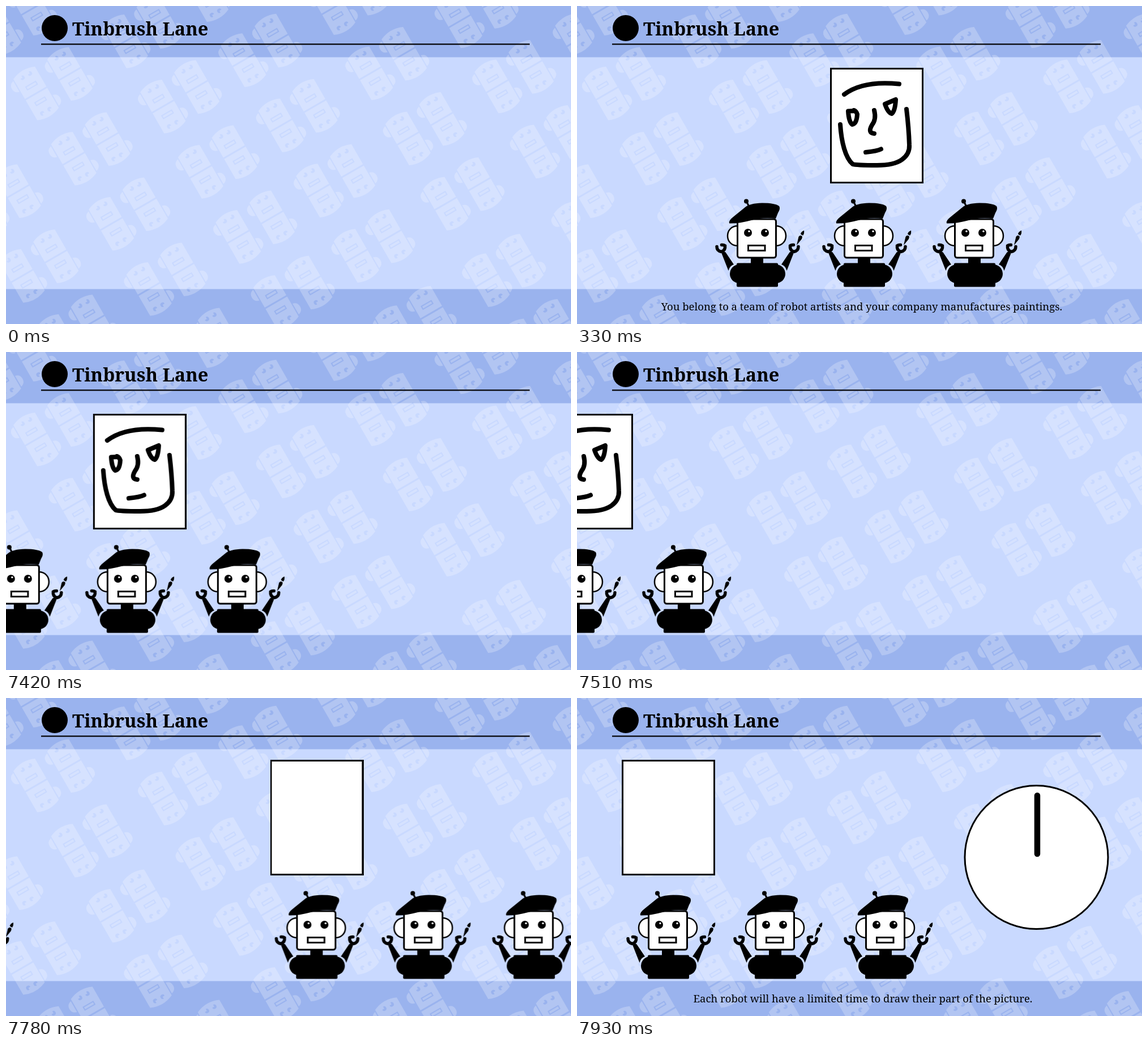
These frames come from a looping animation (998 px wide and 561 px high, 8 s). An HTML page:

```html
<!DOCTYPE html>
<html lang="en">
<head>
<meta charset="utf-8">
<title>Tinbrush Lane</title>
<style>
  html, body { margin: 0; width: 100%; height: 100%; overflow: hidden; background: #9ab3ee; }
  svg { display: block; width: 998px; height: 561px; }
  text { font-family: "Noto Serif", serif; font-size: 18.5px; text-anchor: middle; }
  .title { font-size: 32.4px; font-weight: 700; text-anchor: start; }
  .paper { fill: #fff; stroke: #000; stroke-width: 3; }
  .ink { fill: none; stroke: #000; stroke-width: 8; stroke-linecap: round; stroke-linejoin: round; }

  .first, .second, .cap1, .cap2 { animation: 8s linear infinite; }
  .first { animation-name: first; }
  .second { animation-name: second; }
  .cap1 { animation-name: cap1; }
  .cap2 { animation-name: cap2; }

  /* the scene moves once every 30 ms */
  @keyframes first {
    0% { transform: translateX(806px); animation-timing-function: steps(11, end); }
    4.125%, 91.25% { transform: translateX(0); animation-timing-function: steps(10, end); }
    95% { transform: translateX(-733px); animation-timing-function: steps(11, end); }
    99.125%, 100% { transform: translateX(-805px); }
  }
  @keyframes second {
    0%, 94.625% { transform: translateX(930px); animation-timing-function: steps(12, end); }
    99.125%, 100% { transform: translateX(0); }
  }
  @keyframes cap1 {
    0% { opacity: 0; animation-timing-function: step-end; }
    4.125% { opacity: 1; animation-timing-function: step-end; }
    91.625%, 100% { opacity: 0; animation-timing-function: step-end; }
  }
  @keyframes cap2 {
    0% { opacity: 0; animation-timing-function: step-end; }
    99.125%, 100% { opacity: 1; }
  }
</style>
</head>
<body>
<svg viewBox="0 0 998 561">
  <defs>
    <path id="half" fill-rule="evenodd" d="M-22-1.5V-42Q0-52 22-42V-1.5Z
      M-24-39Q-33-37-33-28Q-33-19-24-17Z
      M-11-36a4 4 0 1 0 4-4v4z M4-36a4 4 0 1 0 4-4v4z
      M-11-20H11V-12H-11Z M-9-18H9V-14H-9Z"/>
    <g id="card">
      <use href="#half"/>
      <use href="#half" transform="rotate(180)"/>
    </g>
    <g id="pair" transform="rotate(-30)">
      <use href="#card" x="-34.5"/>
      <use href="#card" x="34.5"/>
    </g>

    <path id="ear" class="paper" style="stroke-width:2.5" d="M284 388C260 388 260 423 284 423"/>
    <g id="arm">
      <path d="M255.5 436.5Q259 432 262.5 434.5L277 456Q270 458 267.5 467Z"/>
      <path d="M247 424.5Q247 432 255 433.5Q262.5 431 261.5 423Q259 421 255.5 421.5"
        fill="none" stroke="#000" stroke-width="5.5" stroke-linecap="round"/>
    </g>
    <g id="eye">
      <circle cx="302" cy="400" r="7"/>
      <circle cx="304" cy="397.5" r="1.7" fill="#fff"/>
    </g>
    <g id="robot">
      <use href="#ear"/>
      <use href="#ear" transform="matrix(-1 0 0 1 635 0)"/>
      <rect x="307" y="444" width="22" height="12"/>
      <rect x="282" y="453.5" width="73" height="42" rx="2"/>
      <rect x="270" y="456" width="98" height="33" rx="16.5"/>
      <use href="#arm"/>
      <use href="#arm" transform="matrix(-1 0 0 1 638 0)"/>
      <path d="M388 422L391.5 407Q395 402.5 398 407L397 411Z"/>
      <path d="M395 402.5Q395.5 398 401 396Q402 401 399 405Z"/>
      <rect class="paper" x="283.5" y="376" width="68" height="68" rx="4"/>
      <use href="#eye"/>
      <use href="#eye" x="30"/>
      <rect class="paper" x="302.5" y="422.5" width="29.5" height="9"/>
      <path d="M299 344L304 354" stroke="#000" stroke-width="3"/>
      <circle cx="299" cy="344.5" r="4"/>
      <path d="M269 383.5Q267 379 276 372L297 355Q305 348 327 347.5Q350 347.5 357 353
        Q360 357 355 365L351 375Q329 372 308 378Q286 384 269 383.5Z"/>
    </g>
    <g id="team">
      <use href="#robot"/>
      <use href="#robot" x="189"/>
      <use href="#robot" x="384"/>
    </g>
    <rect id="canvas" class="paper" x="80.5" y="110.5" width="162" height="201"/>
  </defs>

  <rect width="998" height="561" fill="#9ab3ee"/>
  <rect y="90.4" width="998" height="409" fill="#c9d9ff"/>
  <g id="pattern" fill="#fff" fill-opacity=".23"></g>

  <circle cx="86" cy="39" r="23"/>
  <text class="title" x="117" y="52">Tinbrush Lane</text>
  <rect x="62" y="66.3" width="863" height="2.2"/>

  <g class="first">
    <use href="#canvas" x="368"/>
    <g class="ink">
      <path d="M472 156Q505 131 569 137.5"/>
      <path d="M491 185L479 185.5Q480 204 486 209Q494 208 495 191Q493 185 489 184"/>
      <path d="M544 173L563 165Q562 185 556 190Q549 188 544 173Z"/>
      <path d="M525 184Q529 200 521 210Q513 224 525 225"/>
      <path d="M510 258Q530 256 537 252.5"/>
      <path d="M465 209C467 240 474 268 487 279Q493 281 530 281Q560 281 574 271Q588 261 587 245Q586 215 582 182"/>
    </g>
    <use href="#team"/>
  </g>

  <g class="second">
    <use href="#canvas"/>
    <use href="#team" x="-157"/>
    <circle class="paper" cx="811.5" cy="281" r="126.5"/>
    <path class="ink" style="stroke-width:10.5" d="M813 172V275"/>
  </g>

  <text class="cap1" x="503" y="537">You belong to a team of robot artists and your company manufactures paintings.</text>
  <text class="cap2" x="505" y="537">Each robot will have a limited time to draw their part of the picture.</text>
</svg>
<script>
  // slanted lattice of robot pairs with a slight sway; it drops past a diagonal seam
  let pairs = "";
  for (let row = -2; row <= 4; row++) {
    for (let col = -1; col <= 5; col++) {
      const sway = Math.sin(col * Math.PI * 2 / 3);
      const drop = col + row > 4 ? 20 : 0;
      const x = 83 + 219 * col + 66.5 * row + 6 * sway + drop / 3;
      const y = 137 + 26.5 * col + 115 * row - 4 * sway + drop;
      pairs += `<use href="#pair" transform="translate(${x} ${y})"/>`;
    }
  }
  document.getElementById("pattern").innerHTML = pairs;
</script>
</body>
</html>
```
